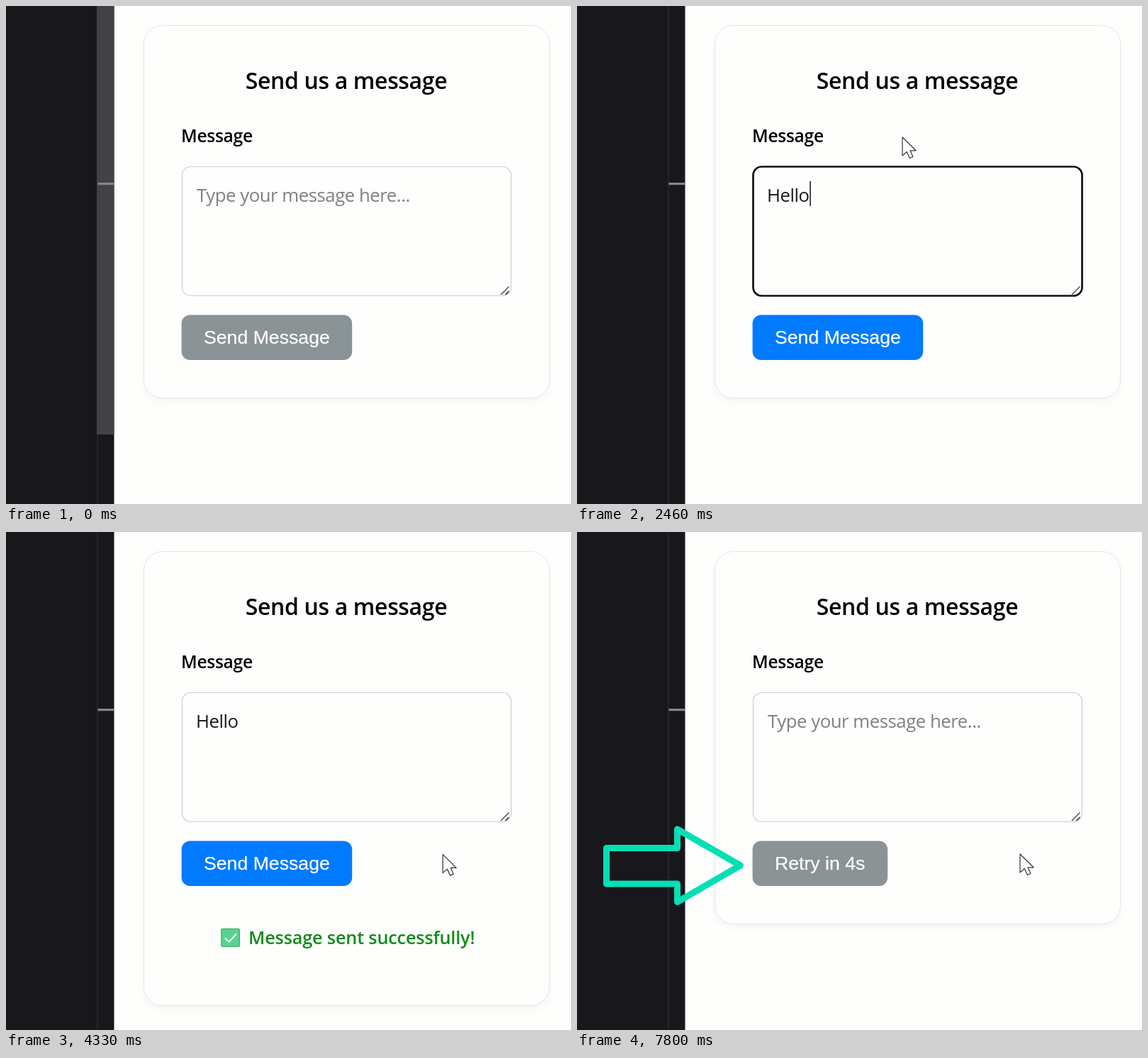
Write an HTML page that moves like this. It is 797 by 702 pixels and loops after 8000 ms.

```html
<!DOCTYPE html>
<html lang="en">
<head>
<meta charset="utf-8">
<title>Message form</title>
<style>
  html, body { margin: 0; width: 100%; height: 100%; overflow: hidden; background: #fefefd; }
  svg { display: block; width: 100%; height: 100%; }
  text { font-family: "Open Sans", "Noto Sans", sans-serif; white-space: pre; }
  .title { font-size: 32px; font-weight: 600; letter-spacing: -.35px; }
  .label { font-size: 24.6px; font-weight: 600; letter-spacing: -.3px; }
  .entry { font-size: 25.7px; letter-spacing: -.45px; }
  .done { font-size: 25.3px; font-weight: 600; letter-spacing: -.2px; fill: #138a1b; }
  .btn { font-family: "Liberation Sans", Arial, sans-serif; font-size: 26.67px; fill: #fff; stroke: #fff; stroke-width: .25px; }
</style>
</head>
<body>
<svg viewBox="0 0 797 702">
  <defs>
    <filter id="shadow" x="-5%" y="-5%" width="110%" height="112%">
      <feDropShadow dx="0" dy="4" stdDeviation="4" flood-color="#000" flood-opacity=".04"/>
    </filter>
  </defs>
  <rect width="797" height="702" fill="#fefefd"/>
  <rect width="152.5" height="702" fill="#18181c"/>
  <rect x="128.5" width="1" height="702" fill="#303238"/>
  <rect id="slider" x="128" width="24.5" height="604" fill="#424247"/>
  <rect x="129.5" y="249" width="22.5" height="3.2" fill="#85878a"/>

  <rect id="card" x="194.5" y="27.5" width="572" rx="26" fill="#fefefd" stroke="#e5e5e5" filter="url(#shadow)"/>
  <text class="title" x="480" y="116.5" text-anchor="middle">Send us a message</text>
  <text class="label" x="247" y="192">Message</text>

  <rect id="area" x="248.5" y="226.5" width="464" height="182" rx="12" fill="#fefefd"/>
  <path d="M698 407L709.5 395.5" stroke="#555" stroke-width="1.6"/>
  <path id="grip" d="M704.5 407L709.5 402" stroke="#555" stroke-width="1.8"/>
  <text id="hint" class="entry" x="269" y="276" fill="#808080">Type your message here...</text>
  <text id="typed" class="entry" x="268" y="276" fill="#1a1a1a"></text>
  <rect id="caret" y="247" width="1.5" height="35" fill="#111"/>

  <rect id="button" x="247.6" y="435.6" height="63.4" rx="12"/>
  <text id="caption" class="btn" x="279" y="476"></text>

  <g id="success">
    <rect x="303.8" y="559.3" width="25.6" height="25.2" rx="2" fill="#58d38c" stroke="#46a874" stroke-width="1.2"/>
    <path d="M309 572.5L314.5 578L325 566.5" fill="none" stroke="#effff5" stroke-width="2.2"/>
    <text class="done" x="342" y="580.5">Message sent successfully!</text>
  </g>

  <path id="arrow" d="M41.5 445.5H141.5V419L230.5 470L141.5 521.5V496H41.5Z" fill="none"
        stroke="#04dfb5" stroke-width="9" stroke-linejoin="round"/>

  <g id="mouse" stroke-linejoin="round">
    <path id="pointer" d="M0 0V26L6.2 20.5L10.4 29.5L14.8 27.5L11 18.8H19Z" fill="#fff" stroke="#333" stroke-width="1.2"/>
    <path id="beam" d="M-5 -14Q0 -14 0 -11Q0 -14 5 -14M0 -11V11M-5 14Q0 14 0 11Q0 14 5 14" fill="none" stroke="#222" stroke-width="1.5"/>
    <g id="hand">
      <path d="M-2 2Q-2 0 0 0Q2.4 0 2.4 2.5V11Q4.5 8.5 6.3 11.5Q8.8 9.8 10 13Q13.5 12 13.5 16V23Q13.5 27 10.5 30V33H-2V30L-10.5 20.5Q-13 17 -9.5 15.5Q-7.5 15 -5 18.5L-2 20.5Z" fill="#fff" stroke="#222" stroke-width="1.2"/>
      <path d="M2.4 10V17M6.4 11.5V18M10 13V19" fill="none" stroke="#222"/>
    </g>
  </g>
</svg>
<script>
const LOOP = 8000, BLINK = 530;
const FOCUS = 660, BLUR = 3600, SENT = 3740, COOL = 4800, RESET = 6740;
const WORD = "Hello", KEYS = [1660, 1860, 2060, 2260, 2460];
const GREY = [138, 147, 149], BLUE = [0, 123, 255], HOVER = [0, 86, 179];
const FILLS = [[-999, GREY], [KEYS[0], BLUE], [3395, HOVER], [4056, BLUE], [COOL, GREY]];

// Each move: start, end, then the point reached.
const MOVES = [[60, 440, 455, 262], [800, 990, 459, 185], [3000, 3500, 429, 468], [3860, 4400, 625, 454]];

const el = {};
document.querySelectorAll("[id]").forEach(e => el[e.id] = e);

const clamp = v => Math.max(0, Math.min(1, v));
const smooth = v => v * v * (3 - 2 * v);
const mix = (a, b, p) => a + (b - a) * p;
const set = (e, attrs) => { for (const k in attrs) e.setAttribute(k, attrs[k]); };
const show = (e, on) => e.setAttribute("visibility", on ? "visible" : "hidden");
const within = (x, y, l, t, r, b) => x >= l && x <= r && y >= t && y <= b;

function mouseAt(t) {
  let x = -25, y = 300;
  for (const [from, to, tx, ty] of MOVES) {
    const p = smooth(clamp((t - from) / (to - from)));
    x = mix(x, tx, p);
    y = mix(y, ty, p);
  }
  return [x, y];
}

function fillAt(t) {
  let color = GREY;
  for (const [from, next] of FILLS) {
    const p = 1 - (1 - clamp((t - from) / 200)) ** 2.4;
    color = color.map((c, i) => mix(c, next[i], p));
  }
  return `rgb(${color.map(Math.round)})`;
}

function drawForm(t) {
  const focused = t >= FOCUS && t < BLUR;
  const count = t < RESET ? KEYS.filter(k => t >= k).length : 0;
  const sent = t >= SENT && t < RESET;
  const cooling = t >= COOL;

  set(el.card, { height: sent ? 640 : 525 });
  set(el.area, { stroke: focused ? "#111" : "#cfcfcf", "stroke-width": focused ? 2.7 : 1.2 });
  show(el.grip, !focused);
  show(el.hint, count === 0);
  el.typed.textContent = WORD.slice(0, count);

  const since = t - (count ? KEYS[count - 1] : FOCUS);
  show(el.caret, focused && Math.floor(since / BLINK) % 2 === 0);
  set(el.caret, { x: 268.7 + (count ? el.typed.getComputedTextLength() : 0) });

  const left = 7 - Math.floor((t - COOL) / 1000);
  el.caption.textContent = cooling ? `Retry in ${left}s` : "Send Message";
  set(el.button, { width: cooling ? 190.6 : 240.6, fill: fillAt(t) });
  show(el.success, sent);
}

function drawMouse(t) {
  const [x, y] = mouseAt(t);
  const beam = within(x, y, 248, 226, 713, 409);
  const hand = t < COOL && within(x, y, 248, 436, 488, 499);
  set(el.mouse, { transform: `translate(${x} ${y})` });
  show(el.beam, beam);
  show(el.hand, hand);
  show(el.pointer, !beam && !hand);
}

function render(t) {
  set(el.slider, { opacity: 1 - clamp((t - 60) / 560) });
  set(el.arrow, { opacity: clamp((t - 4960) / 640) });
  drawForm(t);
  drawMouse(t);
}

const start = performance.now();
function tick(now) {
  render(Math.max(0, now - start) % LOOP);
  requestAnimationFrame(tick);
}
render(0);
requestAnimationFrame(tick);
</script>
</body>
</html>
```
